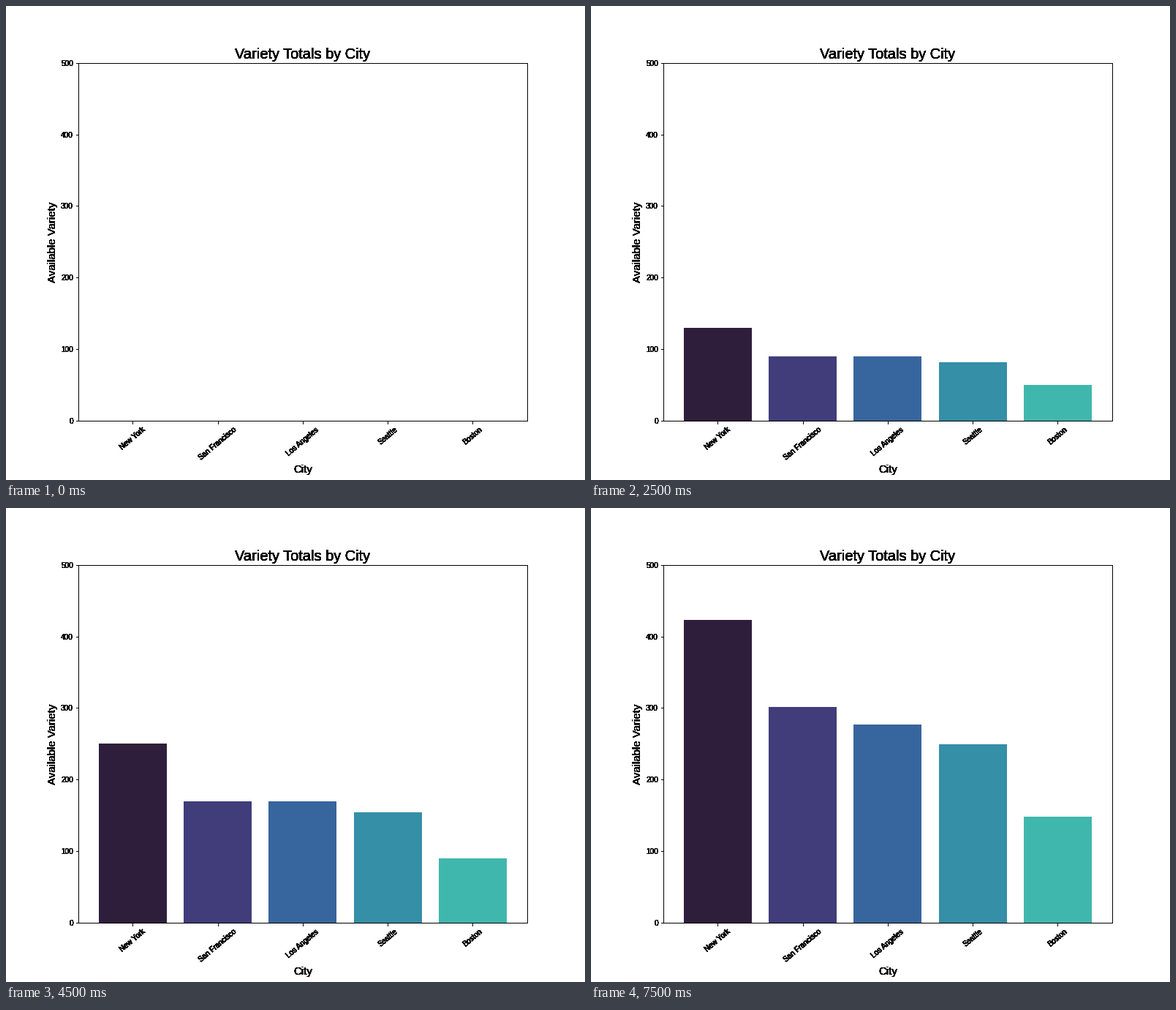
A matplotlib script for the animation above (8000 ms loop, 792 by 648 pixels).

```python
import matplotlib.pyplot as plt
from matplotlib.animation import FuncAnimation

WIDTH, HEIGHT, DPI = 792, 648, 72
FRAMES, INTERVAL = 16, 500
LAYERS = 10  # stacked axes darken the antialiased edges of text and lines

CITIES = ["New York", "San Francisco", "Los Angeles", "Seattle", "Boston"]
COLORS = ["#2e1e3b", "#413d7b", "#37659e", "#348fa7", "#40b7ad"]
STEPS = [30, 20, 20, 18, 10]
TOTALS = [423, 301, 277, 249, 148]
START = 10

plt.rcParams["font.family"] = "Liberation Sans"
plt.rcParams["toolbar"] = "None"

fig = plt.figure(figsize=(WIDTH / DPI, HEIGHT / DPI), dpi=DPI, facecolor="white")


def add_layer():
    ax = fig.add_axes([0.125, 0.125, 0.775, 0.755], facecolor="none")
    ax.set_xlim(-0.64, 4.64)
    ax.set_ylim(0, 500)
    ax.set_xticks(range(len(CITIES)), CITIES, rotation=40, fontsize=10)
    ax.set_yticks(range(0, 501, 100))
    ax.set_title("Variety Totals by City", fontsize=20)
    ax.set_xlabel("City", fontsize=15)
    ax.set_ylabel("Available Variety", fontsize=15)
    return ax


layers = [add_layer() for _ in range(LAYERS)]
bars = layers[0].bar(range(len(CITIES)), [0] * len(CITIES), width=0.8,
                     color=COLORS, linewidth=0)


def heights(frame):
    if frame == 0:
        return [0] * len(CITIES)
    if frame == FRAMES - 1:
        return TOTALS
    return [START + step * (frame - 1) for step in STEPS]


def update(frame):
    for bar, height in zip(bars, heights(frame)):
        bar.set_height(height)
    return bars.patches


anim = FuncAnimation(fig, update, frames=FRAMES, interval=INTERVAL,
                     repeat=True, repeat_delay=0, blit=False)
plt.show()
```
